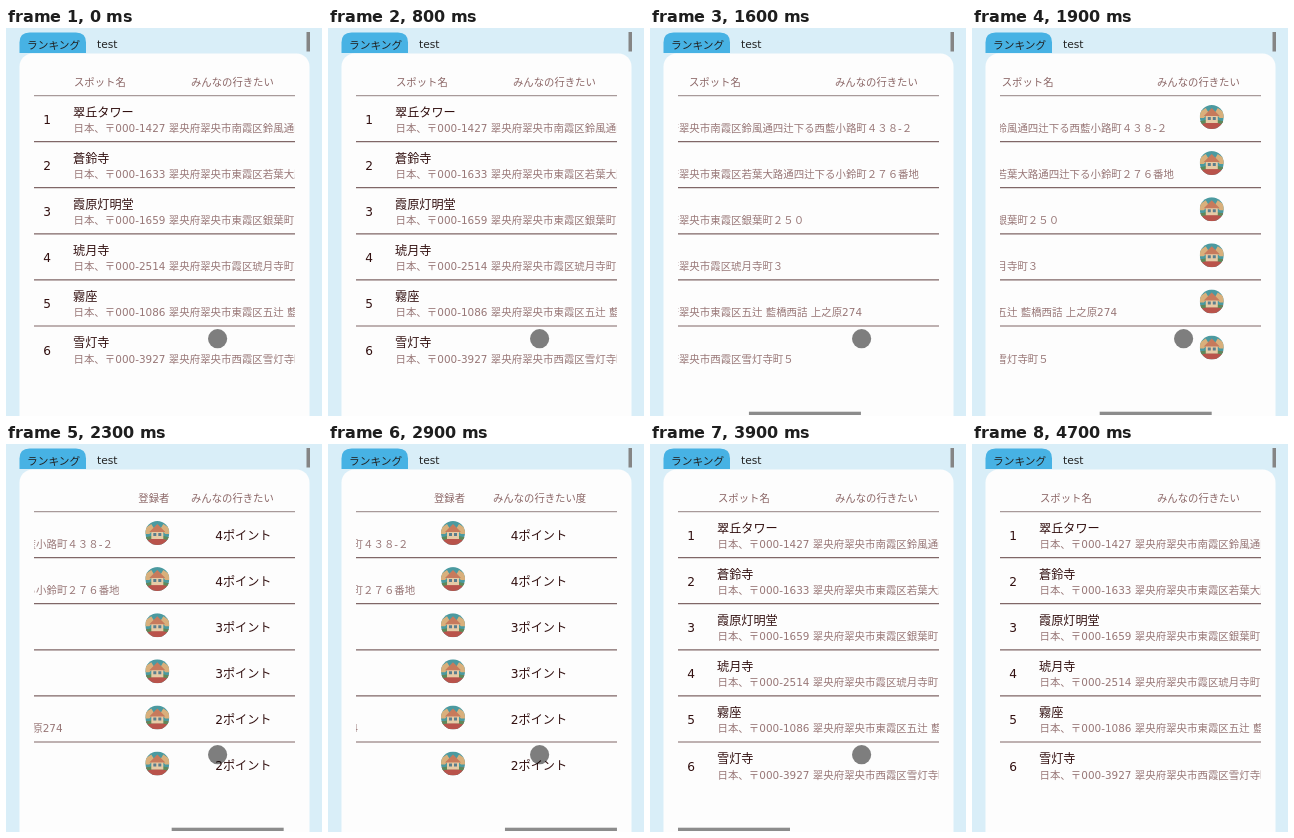
An HTML page for the animation above (4800 ms loop, 316x388 px).

```html
<!DOCTYPE html>
<html lang="ja">
<meta charset="utf-8">
<style>
  html, body { margin: 0; width: 100%; height: 100%; overflow: hidden; background: #d9eef8; }
  svg { display: block; }
  text { font: 10.45px "DejaVu Sans", "Noto Sans CJK JP", "Noto Sans CJK", sans-serif; fill: #987777; }
  .tab { font-size: 10.7px; fill: #222; }
  .head { font-size: 10.35px; fill: #8a6565; }
  .name { font-size: 12.15px; fill: #321010; }
  .mid { text-anchor: middle; }
  .line { stroke: #806767; stroke-width: 1.2; }
  .top { stroke: #a89a9a; stroke-width: 1.2; }
</style>
<body>
<svg width="316" height="388" viewBox="0 0 316 388">
  <defs>
    <clipPath id="round"><circle r="12"/></clipPath>
    <g id="badge" clip-path="url(#round)">
      <rect x="-12" y="-12" width="24" height="24" fill="#4b9aa0"/>
      <path d="M-12 -5L-6 -9L-3 -4L-8 1H-12ZM12 -5L6 -9L3 -4L8 1H12Z" fill="#d9b07c"/>
      <rect x="-12" y="4" width="24" height="8" fill="#b9534b"/>
      <path d="M-12 6Q0 2 12 6" fill="none" stroke="#5d8a5a" stroke-width="3"/>
      <rect x="-6" y="-2" width="12" height="8" fill="#e6cba6"/>
      <path d="M-8 -1L0 -9L8 -1Z" fill="#c77a5c"/>
      <path d="M-4 0H-1V3H-4ZM1 0H4V3H1Z" fill="#5b7d8c"/>
    </g>
  </defs>
  <path d="M13.5 25V14.5Q13.5 4.5 23.5 4.5H70Q80 4.5 80 14.5V25Z" fill="#47b2e4"/>
  <rect x="13.5" y="25.5" width="290" height="400" rx="13" fill="#fdfdfd"/>
  <text class="tab" x="21" y="20.5">ランキング</text>
  <text class="tab" x="91" y="20">test</text>
  <rect x="300.5" y="4" width="3.5" height="19.5" fill="#858585"/>
  <svg x="28" width="261" height="388" viewBox="28 0 261 388">
    <g id="rows"></g>
    <text id="spot" class="head" y="58">スポット名</text>
    <text id="owner" class="head" y="58">登録者</text>
    <g id="wish">
      <rect x="-15" y="42" width="140" height="24" fill="#fdfdfd"/>
      <text class="head" y="58">みんなの行きたい<tspan id="degree">度</tspan></text>
    </g>
    <path class="top" d="M28 67.7H289"/>
    <path id="lines" class="line"/>
    <rect id="thumb" y="383.7" width="112" height="3.3" fill="#8c8c8c"/>
  </svg>
  <circle id="pointer" cx="211.6" cy="310.7" r="9.6" fill-opacity=".5"/>
</svg>
<script>
const $ = id => document.getElementById(id);
const places = [
  ['翠丘タワー', '000-1427 翠央府翠央市南霞区鈴風通四辻下る西藍小路町４３８-２', 4],
  ['蒼鈴寺', '000-1633 翠央府翠央市東霞区若葉大路通四辻下る小鈴町２７６番地', 4],
  ['霞原灯明堂', '000-1659 翠央府翠央市東霞区銀葉町２５０', 3],
  ['琥月寺', '000-2514 翠央府翠央市霞区琥月寺町３', 3],
  ['霧座', '000-1086 翠央府翠央市東霞区五辻 藍橋西詰 上之原274', 2],
  ['雪灯寺', '000-3927 翠央府翠央市西霞区雪灯寺町５', 2],
];
const rowHeight = 46.1;

$('rows').innerHTML = places.map(([name, address, points], i) => `
  <g transform="translate(0 ${i * rowHeight})">
    <text class="name mid" x="41" y="96">${i + 1}</text>
    <text class="name" x="67" y="88.5">${name}</text>
    <text x="67.5" y="104">日本、〒${address}</text>
    <use href="#badge" x="472" y="89"/>
    <text class="name mid" x="558" y="95.5">${points}ポイント</text>
  </g>`).join('');
$('lines').setAttribute('d',
  places.slice(1).map((_, i) => `M28 ${113.6 + i * rowHeight}H289`).join(''));

// [time in ms, horizontal scroll]
const maxScroll = 347;
const keys = [[0, 0], [870, 0], [1300, 98], [1900, 232], [2420, maxScroll],
  [3000, maxScroll], [3300, 49], [3480, 0], [4800, 0]];

function scrollAt(t) {
  const i = keys.findIndex(k => k[0] > t);
  const [t0, a] = keys[i - 1], [t1, b] = keys[i];
  return a + (b - a) * (t - t0) / (t1 - t0);
}

const show = (id, on) => $(id).style.visibility = on ? 'visible' : 'hidden';
const shift = (id, x) => $(id).setAttribute('transform', `translate(${x})`);

function draw(now) {
  const t = now % 4800, s = scrollAt(t), rest = maxScroll - s;
  shift('rows', -s);
  // header cells stick to the edges until their columns arrive
  shift('spot', Math.max(39, 68 - s) - Math.max(0, s - 223));
  shift('owner', 106 + rest);
  shift('wish', Math.min(185, 165 + rest));
  show('degree', rest < 18);
  shift('thumb', 28 + s * 261 / 608);
  show('thumb', t >= 870 && t < 4000);
  show('pointer', t < 4600);
  requestAnimationFrame(draw);
}
draw(performance.now());
</script>
</body>
</html>
```
